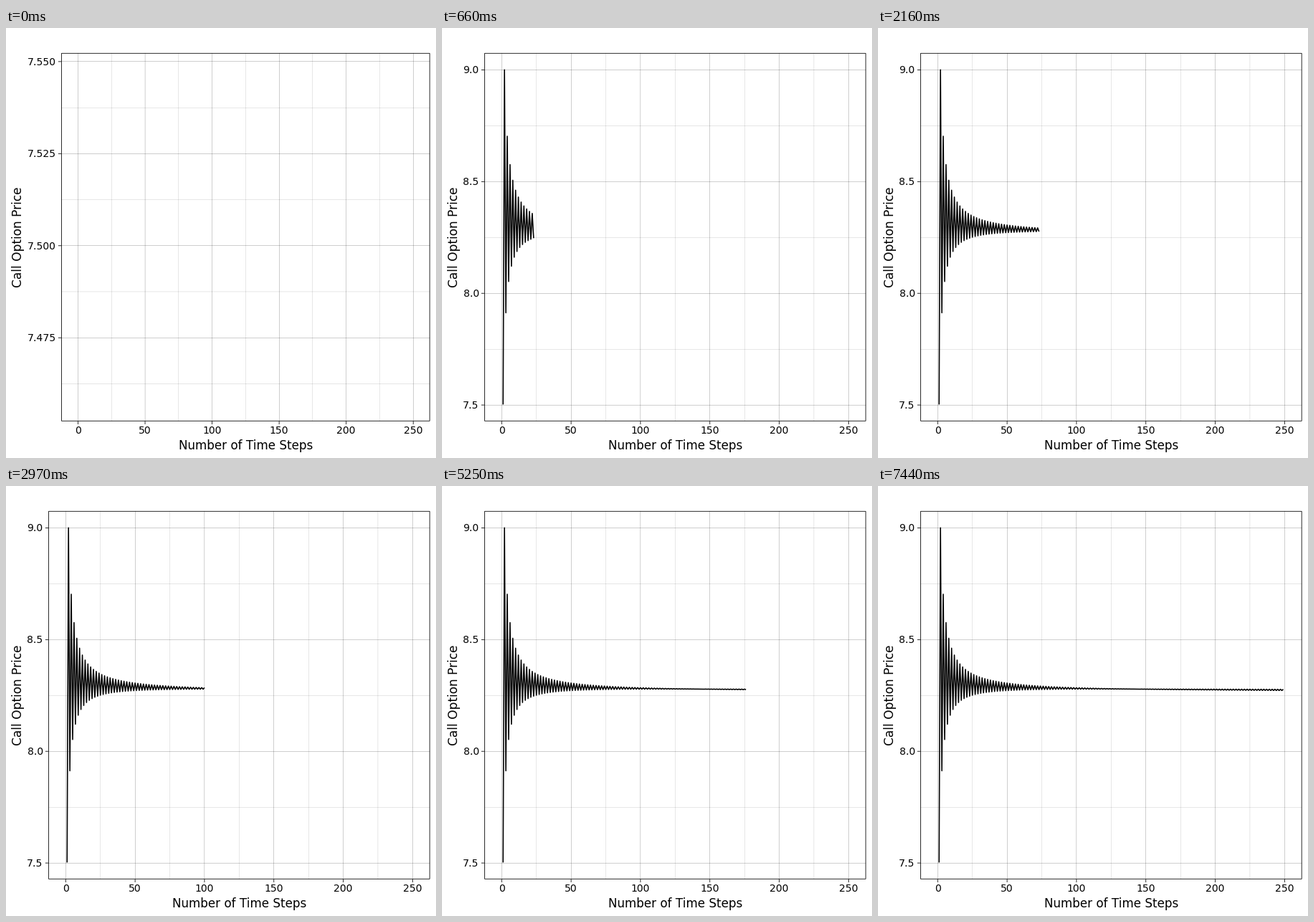
Animation, 600 px wide and 600 px high, one loop 7.47 s. Source, as a matplotlib script:

```python
import math

import matplotlib.pyplot as plt
import numpy as np
from matplotlib.animation import FuncAnimation
from matplotlib.patches import Rectangle

SIZE, DPI = 600, 100
FRAMES, INTERVAL = 249, 30
PT = 72 / DPI                       # points per pixel
TOP, BOTTOM, RIGHT = 34.9, 548.7, 591.6
BORDER, MAJOR, MINOR = 0.82, 0.19, 0.095

plt.rcParams["font.family"] = "DejaVu Sans"


def call_price(steps, strike=109.595, vol=0.2, shift=-0.0084, drift=0.0005):
    """Binomial tree price of a European call over one year."""
    dx = vol / math.sqrt(steps)
    up, down = math.exp(dx), math.exp(-dx)
    p = (math.exp(drift / steps) - down) / (up - down)
    total = 0.0
    for j in range(steps + 1):
        payoff = math.exp(shift + dx * (2 * j - steps)) - 1
        if payoff > 0:
            total += math.comb(steps, j) * p**j * (1 - p)**(steps - j) * payoff
    return strike * total


n = np.arange(1, FRAMES + 1)
price = np.array([call_price(int(k) + 1) for k in n])

fig = plt.figure(figsize=(SIZE / DPI, SIZE / DPI), dpi=DPI, facecolor="white")
ax = fig.add_axes([0, 0, 1, 1])
ax.set_xlim(0, SIZE)
ax.set_ylim(SIZE, 0)
ax.axis("off")


class Panel:
    """Axes frame with grid, ticks and labels in pixel coordinates."""

    def __init__(self, left, ylim, y_major, y_minor, fmt):
        self.left, self.ylim = left, ylim
        self.parts = []
        for v in range(25, 250, 50):
            self.grid_x(v, MINOR)
        for v in y_minor:
            self.grid_y(v, MINOR)
        for v in range(0, 251, 50):
            x = self.grid_x(v, MAJOR)
            self.line([x, x], [BOTTOM, BOTTOM + 4.25], BORDER)
            self.text(x, 566, str(v), 14)
        for v in y_major:
            y = self.grid_y(v, MAJOR)
            self.line([left - 4.25, left], [y, y], BORDER)
            self.text(left - 7.4, y + 5, format(v, fmt), 14, ha="right")
        # the border lies just inside the panel edge
        box = Rectangle((left + BORDER / 2, TOP + BORDER / 2),
                        RIGHT - left - BORDER, BOTTOM - TOP - BORDER,
                        fill=False, ec="black", lw=BORDER * PT, zorder=5,
                        snap=False)
        self.parts.append(ax.add_patch(box))
        self.text((left + RIGHT) / 2, 588, "Number of Time Steps", 16.8)

    def px(self, v):
        return self.left + (v + 12.5) / 275 * (RIGHT - self.left)

    def py(self, v):
        lo, hi = self.ylim
        return BOTTOM - (v - lo) / (hi - lo) * (BOTTOM - TOP)

    def line(self, xs, ys, width):
        self.parts += ax.plot(xs, ys, color="black", lw=width * PT, zorder=1,
                              solid_capstyle="butt", snap=False)

    def grid_x(self, v, width):
        x = self.px(v)
        self.line([x, x], [TOP, BOTTOM], width)
        return x

    def grid_y(self, v, width):
        y = self.py(v)
        self.line([self.left, RIGHT], [y, y], width)
        return y

    def text(self, x, y, s, px, ha="center"):
        self.parts.append(ax.text(x, y, s, fontsize=px * PT, ha=ha,
                                  va="baseline"))

    def show(self, on):
        for part in self.parts:
            part.set_visible(on)


pad = 0.05 * np.ptp(price)
first = Panel(77.1, (price[0] - 0.05, price[0] + 0.05),
              np.arange(7.475, 7.56, 0.025), np.arange(7.4625, 7.54, 0.025),
              ".3f")
full = Panel(59.1, (price.min() - pad, price.max() + pad),
             np.arange(7.5, 9.1, 0.5), np.arange(7.75, 8.8, 0.5), ".1f")

ax.text(21.8, 291.8, "Call Option Price", fontsize=17 * PT, rotation=90,
        rotation_mode="anchor", ha="center", va="baseline")
curve, = ax.plot([], [], color="black", lw=1.6 * PT, zorder=3, snap=False,
                 solid_capstyle="butt", solid_joinstyle="round")
xs, ys = full.px(n), full.py(price)


def draw(i):
    first.show(i == 0)
    full.show(i > 0)
    count = i + 1 if i else 0
    curve.set_data(xs[:count], ys[:count])
    return [curve]


anim = FuncAnimation(fig, draw, frames=FRAMES, interval=INTERVAL, repeat=True,
                     repeat_delay=0, blit=False)
plt.show()
```
